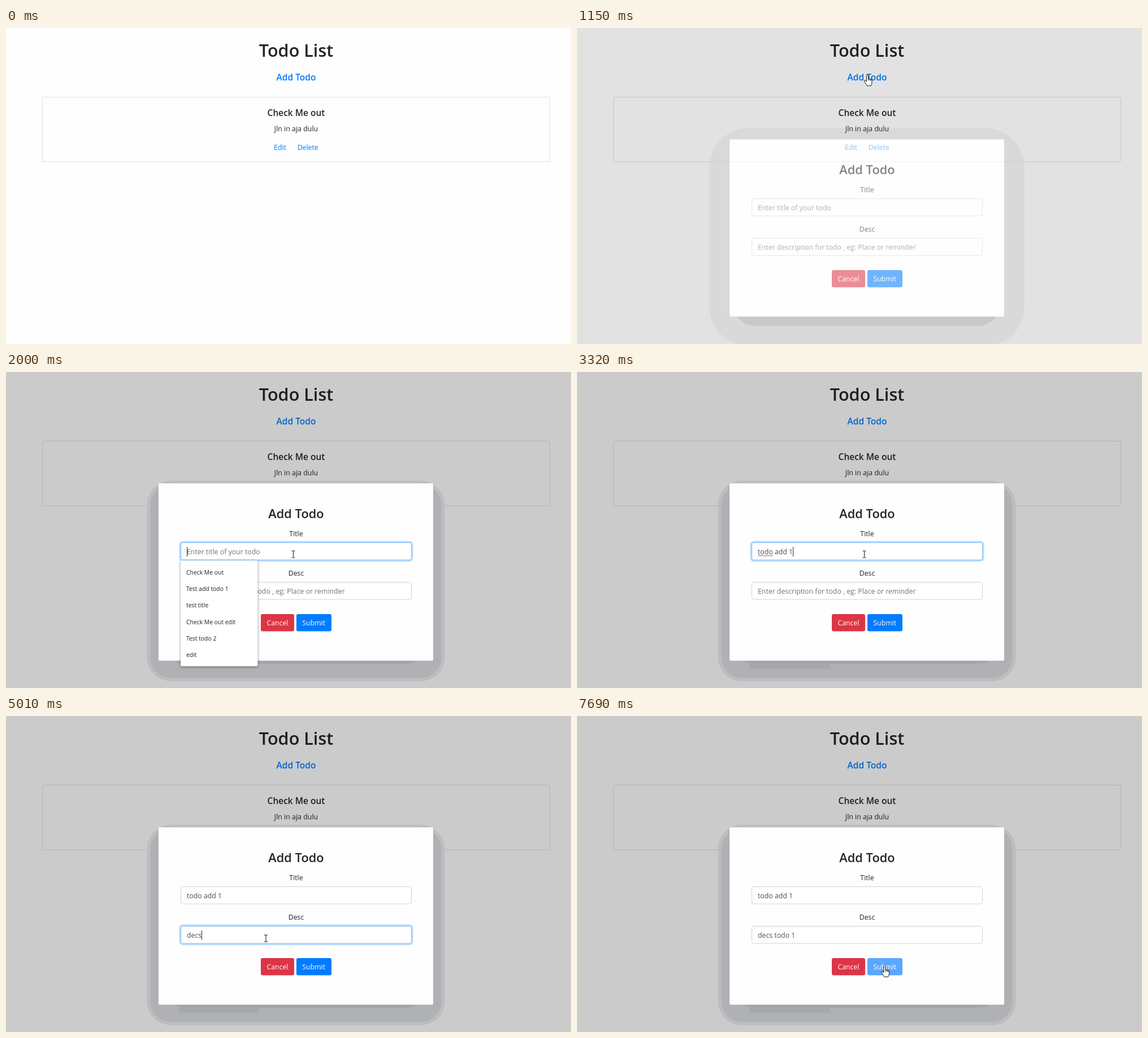
An HTML page with a canvas for the animation above (8 s loop, 1000 by 560 pixels).

```html
<!DOCTYPE html>
<html lang="en">
<head>
<meta charset="utf-8">
<title>Todo List</title>
<style>
  html, body { margin: 0; width: 100%; height: 100%; overflow: hidden; background: #fefefe; }
  canvas { display: block; }
</style>
</head>
<body>
<canvas id="stage" width="1000" height="560"></canvas>
<script>
const stage = document.getElementById('stage').getContext('2d');
const layer = document.createElement('canvas').getContext('2d');
layer.canvas.width = 1000;
layer.canvas.height = 560;
let ctx = stage;

const LOOP = 8000;
const MID = 513.5;
const FAMILY = '"Open Sans", "Noto Sans", sans-serif';
const INK = '#212529', BLUE = '#007bff', PAPER = '#fefefe';
const BODY = 12.3;

const MODAL = { x: 270, y: 197.5, w: 486, h: 314 };
const LINK = { x: 476, y: 72, w: 75, h: 27 };
const SUBMIT = { x: 514, y: 429, w: 62, h: 30.5 };
const CANCEL = { x: 451, y: 429, w: 59, h: 30.5 };

const FIELDS = [
  {
    label: 'Title', hint: 'Enter title of your todo', text: 'todo add 1',
    box: { x: 309.5, y: 302.5, w: 408, h: 30.5 }, focus: 1850, blur: 4290,
    keys: [2330, 2490, 2580, 2680, 2770, 2870, 2960, 3120, 3290, 3320],
    typos: [[0, 4, 2770]]
  },
  {
    label: 'Desc', hint: 'Enter description for todo , eg: Place or reminder', text: 'decs todo 1',
    box: { x: 309.5, y: 372.5, w: 408, h: 30.5 }, focus: 4290, blur: 7300,
    keys: [4490, 4720, 4970, 5010, 5750, 5880, 6030, 6110, 6190, 6260, 6420],
    typos: [[0, 4, 5750], [5, 9, 6340]]
  }
];

const HISTORY = ['Check Me out', 'Test add todo 1', 'test title', 'Check Me out edit', 'Test todo 2', 'edit'];
const MATCHES = ['Test add todo 1', 'test title', 'Test todo 2', 'test'];

// Pointer path: time, x, y
const PATH = [
  [80, 913, 542], [660, 532, 75], [830, 514, 83], [1450, 514, 83], [1800, 508.5, 323],
  [3670, 508.5, 323], [4250, 460, 394], [6890, 460, 394], [7300, 544.5, 443]
];

const clamp = v => Math.min(1, Math.max(0, v));
const lerp = (a, b, k) => a + (b - a) * k;
const ramp = (t, from, to) => clamp((t - from) / (to - from));
const smooth = k => k * k * (3 - 2 * k);
const inside = (p, r) => p.x >= r.x && p.x <= r.x + r.w && p.y >= r.y && p.y <= r.y + r.h;

function mix(a, b, k) {
  return 'rgb(' + a.map((v, i) => Math.round(lerp(v, b[i], k))).join(',') + ')';
}

// The CSS "ease" curve, cubic-bezier(.25, .1, .25, 1)
function ease(x) {
  let lo = 0, hi = 1;
  for (let i = 0; i < 24; i++) {
    const u = (lo + hi) / 2;
    const bx = 0.75 * u * (1 - u) + u * u * u;
    if (bx < x) lo = u; else hi = u;
  }
  const u = lo, v = 1 - u;
  return 0.3 * v * v * u + 3 * v * u * u + u * u * u;
}

function setFont(size, weight = 400) {
  ctx.font = `${weight} ${size}px ${FAMILY}`;
}

function write(str, x, y, { size = BODY, weight = 400, color = INK, align = 'center' } = {}) {
  setFont(size, weight);
  ctx.fillStyle = color;
  ctx.textAlign = align;
  ctx.fillText(str, x, y);
}

function shape(r, radius) {
  ctx.beginPath();
  ctx.roundRect(r.x, r.y, r.w, r.h, radius);
}

function fillBox(r, radius, color) {
  shape(r, radius);
  ctx.fillStyle = color;
  ctx.fill();
}

function strokeBox(r, radius, color, width = 1) {
  shape(r, radius);
  ctx.strokeStyle = color;
  ctx.lineWidth = width;
  ctx.stroke();
}

function drawPage() {
  ctx.fillStyle = PAPER;
  ctx.fillRect(0, 0, 1000, 560);
  write('Todo List', MID, 51, { size: 30.6, weight: 600 });
  write('Add Todo', MID, 93, { size: 15.5, weight: 600, color: BLUE });
  strokeBox({ x: 64.5, y: 122.5, w: 898, h: 114.5 }, 3, 'rgba(0,0,0,.125)');
  write('Check Me out', MID, 156, { size: 15.5, weight: 600 });
  write('Jln in aja dulu', MID, 183, { size: 12.4 });
  write('Edit', 485, 215.5, { color: BLUE });
  write('Delete', 534.2, 215.5, { color: BLUE });
}

// Dimming and shadow lie around the dialog, never beneath it
function drawSurround(t, p) {
  ctx.save();
  ctx.beginPath();
  ctx.rect(0, 0, 1000, 560);
  ctx.roundRect(MODAL.x, MODAL.y, MODAL.w, MODAL.h, 2);
  ctx.clip('evenodd');
  ctx.fillStyle = `rgba(0,0,0,${0.2 * p})`;
  ctx.fillRect(0, 0, 1000, 560);

  const k = ramp(p, 0.56, 1);
  const halo = (e, radius, color) => fillBox({
    x: MODAL.x - e, y: MODAL.y + 16 - e, w: MODAL.w + 2 * e, h: MODAL.h + 2 * e
  }, radius, color);
  // Text under the shadow stays dark
  ctx.globalCompositeOperation = 'darken';
  ctx.globalAlpha = ramp(p, 0.12, 0.5);
  halo(lerp(36, 20.5, k), lerp(70, 42, k), mix([217, 217, 217], [188, 189, 191], k));
  halo(14.5, 36, mix([217, 217, 217], [176, 177, 181], k));
  fillBox({ x: 276, y: 300, w: 474, h: lerp(228, 217, k) }, 40,
    mix([198, 200, 202], [163, 165, 170], k));
  if (t >= 2330) fillBox({ x: 306, y: 500, w: 142.5, h: 26 }, 3, '#a5a7ab');
  ctx.restore();
}

function squiggle(x1, x2, y) {
  ctx.beginPath();
  for (let x = x1, i = 0; x <= x2; x += 1.65, i++) ctx.lineTo(x, y + (i % 2 ? -0.9 : 0.9));
  ctx.strokeStyle = '#e8333a';
  ctx.lineWidth = 1;
  ctx.stroke();
}

function drawField(f, t) {
  const { box } = f;
  const base = box.y + 20.5;
  const left = box.x + 10.5;
  const glow = ease(ramp(t, f.focus, f.focus + 150)) * (1 - ease(ramp(t, f.blur, f.blur + 140)));
  write(f.label, MID, box.y - 11.5);

  if (glow > 0) {
    const ring = { x: box.x - 1.6, y: box.y - 1.6, w: box.w + 3.2, h: box.h + 3.2 };
    strokeBox(ring, 4.5, `rgba(0,123,255,${0.27 * glow})`, 2.8);
  }
  fillBox(box, 3.3, '#fff');
  strokeBox(box, 3.3, mix([206, 212, 218], [128, 189, 255], glow));

  const typed = f.keys.filter(k => k <= t);
  const text = f.text.slice(0, typed.length);
  if (text) write(text, left, base, { color: '#495057', align: 'left' });
  else write(f.hint, left, base, { color: '#6c757d', align: 'left' });

  if (t < f.focus || t >= f.blur) return;
  setFont(BODY);
  const widthTo = n => ctx.measureText(f.text.slice(0, n)).width;
  for (const [from, to, since] of f.typos) {
    if (t >= since) squiggle(left + widthTo(from), left + widthTo(to), base + 2.6);
  }
  const last = typed.length ? typed[typed.length - 1] : f.focus;
  if ((t - last) % 1060 < 530) {
    ctx.fillStyle = '#333';
    ctx.fillRect(Math.round(left + widthTo(typed.length)), base - 13, 1, 17);
  }
}

function drawSuggestions(t) {
  if (t < 2000 || t >= 2490) return;
  const all = t < 2330;
  const items = all ? HISTORY : MATCHES;
  const box = { x: 309, y: 334, w: all ? 136.5 : 115, h: items.length * 29.2 + 12.3 };
  ctx.save();
  ctx.shadowColor = 'rgba(0,0,0,.45)';
  ctx.shadowBlur = 4;
  ctx.shadowOffsetY = 1;
  fillBox(box, 2.5, '#fff');
  ctx.restore();
  items.forEach((item, i) => write(item, 319, 359 + i * 29.2,
    { size: 10.4, weight: 500, color: '#202124', align: 'left' }));
}

function drawButtons(t) {
  fillBox(CANCEL, 3.3, '#dc3545');
  write('Cancel', 480.5, 449, { color: '#fff' });
  const hover = ramp(t, 7200, 7350);
  const off = ramp(t, 7580, 7690);
  const tint = [0, lerp(123, 105, hover), lerp(255, 217, hover)];
  fillBox(SUBMIT, 3.3, mix(tint, [90, 167, 255], off));
  write('Submit', 544.7, 449, { color: '#fff' });
}

// The dialog fades as one piece, so it is composed on its own layer
function drawModal(t, p) {
  ctx = layer;
  ctx.clearRect(0, 0, 1000, 560);
  fillBox(MODAL, 2, PAPER);
  write('Add Todo', MID, 259, { size: 21.8, weight: 600 });
  FIELDS.forEach(f => drawField(f, t));
  drawButtons(t);
  drawSuggestions(t);
  ctx = stage;
  ctx.globalAlpha = p;
  ctx.drawImage(layer.canvas, 0, 0);
  ctx.globalAlpha = 1;
}

function pointerAt(t) {
  let i = 0;
  while (i < PATH.length - 2 && t >= PATH[i + 1][0]) i++;
  const [t0, x0, y0] = PATH[i], [t1, x1, y1] = PATH[i + 1];
  const k = smooth(ramp(t, t0, t1));
  return { x: lerp(x0, x1, k), y: lerp(y0, y1, k) };
}

const ARROW = new Path2D('M0 0V14.2L3.3 11.2L5.5 16L7.7 15L5.5 10.4H10Z');
const HAND = new Path2D('M-1.6 1.6Q0 -.9 1.6 1.6V6.8Q3 5.9 3.9 7.2Q5.2 6.5 6 8Q8 7.6 8 10V13.5' +
  'Q7.8 16.5 6.2 19.3H-.4Q-1.6 16.6 -4.2 13.8Q-6.4 11 -5.2 9.9Q-3.6 9.2 -1.6 11.8Z');
const KNUCKLES = new Path2D('M1.6 6.8V10M3.9 7.2V10.2M6 8V10.5');
const BEAM = new Path2D('M-3 -6H-1Q0 -6 0 -5Q0 -6 1 -6H3M0 -5V5M-3 6H-1Q0 6 0 5Q0 6 1 6H3');

function drawPointer(t) {
  if (t < PATH[0][0]) return;
  const p = pointerAt(t);
  const overText = t > 1200 && FIELDS.some(f => inside(p, f.box));
  const overLink = t < 1700 ? inside(p, LINK) : inside(p, SUBMIT) || inside(p, CANCEL);
  ctx.save();
  ctx.translate(p.x, p.y);
  ctx.strokeStyle = '#111';
  ctx.fillStyle = '#fff';
  ctx.lineWidth = 1;
  ctx.lineJoin = 'round';
  if (overText) {
    ctx.stroke(BEAM);
  } else {
    const icon = overLink ? HAND : ARROW;
    ctx.fill(icon);
    ctx.stroke(icon);
    if (overLink) ctx.stroke(KNUCKLES);
  }
  ctx.restore();
}

function draw(t) {
  const p = ease(ramp(t, 990, 1490));
  drawPage();
  if (p > 0) {
    drawSurround(t, p);
    drawModal(t, p);
  }
  drawPointer(t);
}

const start = performance.now();
function tick() {
  draw((performance.now() - start) % LOOP);
  requestAnimationFrame(tick);
}
tick();
</script>
</body>
</html>
```
